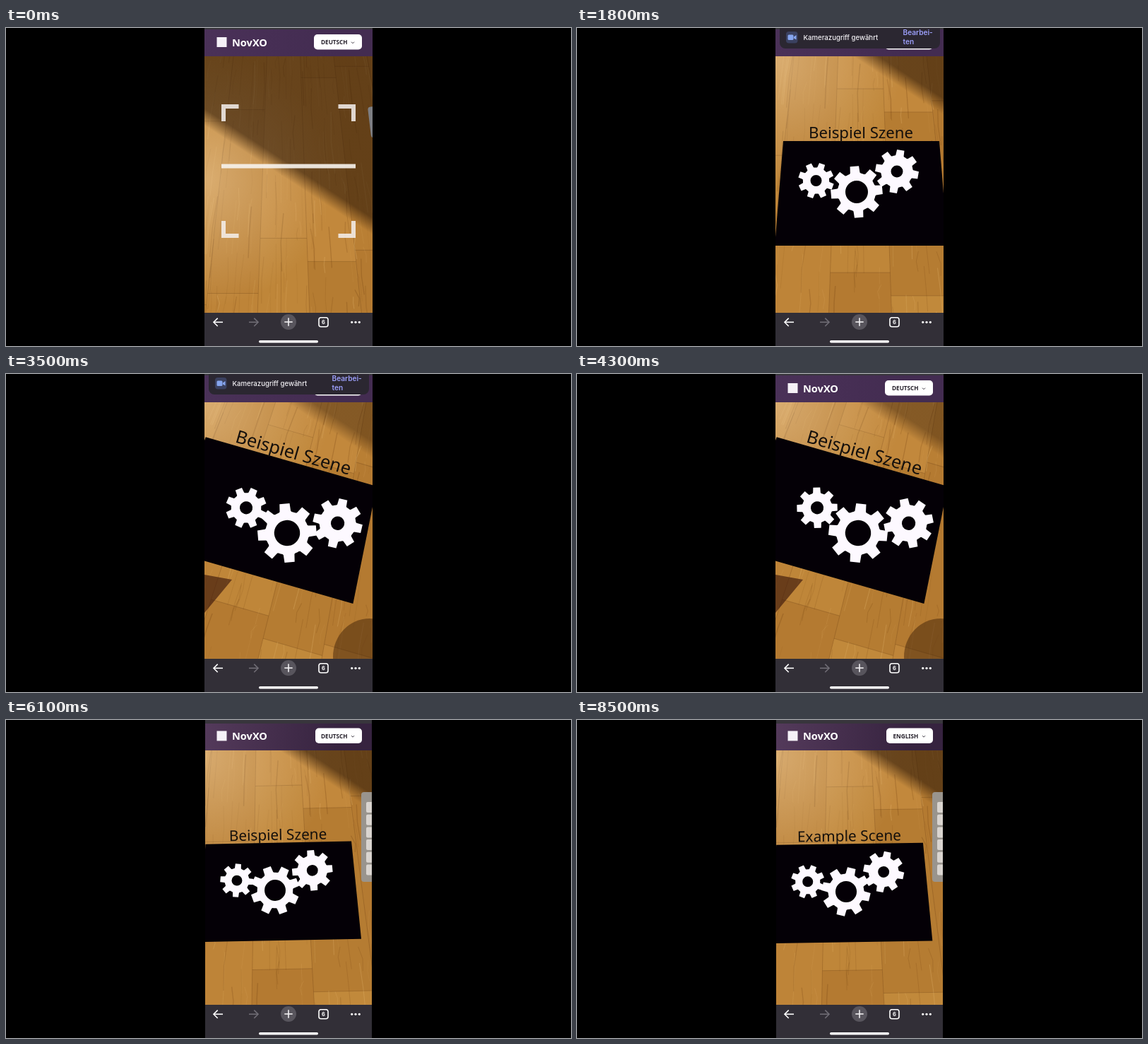
An HTML page with a canvas for the animation above (8600 ms loop, 800x450 px).

```html
<!DOCTYPE html>
<html lang="de">
<head>
<meta charset="utf-8">
<title>AR demo</title>
<style>
html, body { margin: 0; width: 100%; height: 100%; overflow: hidden; background: #000; }
canvas { display: block; }
</style>
</head>
<body>
<canvas id="stage" width="800" height="450"></canvas>
<script>
const ctx = document.getElementById('stage').getContext('2d');
const LOOP = 8600, DETECT = 1500, PAGE_IN = 4400, PAGE_OUT = 5900, MENU = 6700, ENGLISH = 7500;
const SANS = '"Noto Sans", "Open Sans", sans-serif';
const BRAND = 'NovXO';

// The marker as the camera sees it; everything in the scene follows it.
const path = [
  { t: 0, x: 388, y: 514, size: .87, angle: 0, tilt: 0 },
  { t: 900, x: 388, y: 405, size: .9, angle: 0, tilt: 0 },
  { t: 1800, x: 396, y: 232, size: 1, angle: 0, tilt: 0 },
  { t: 3500, x: 398, y: 225, size: 1.14, angle: .28, tilt: 24 },
  { t: 7000, x: 381, y: 241, size: .935, angle: -.02, tilt: 0 },
  { t: 8500, x: 381, y: 243, size: .94, angle: -.015, tilt: 0 }];
const gears = [
  { x: -57.5, y: -16, r: 25.5, hole: 8, phase: 20, speed: -87 },
  { x: 0, y: 0, r: 37, hole: 16, phase: -5, speed: 70 },
  { x: 57, y: -29, r: 31, hole: 8.5, phase: 10, speed: -87 }];

function poseAt(t) {
  const i = Math.max(1, path.findIndex(k => k.t >= t));
  const a = path[i - 1], b = path[i], k = (t - a.t) / (b.t - a.t);
  const pose = {};
  for (const key in a) pose[key] = a[key] + (b[key] - a[key]) * k;
  return pose;
}
const ramp = (t, a, b) => {
  const k = Math.min(1, Math.max(0, (t - a) / (b - a)));
  return k * k * (3 - 2 * k);
};
function seeded(s) {
  return () => (s = (s * 16807) % 2147483647) / 2147483647;
}
function rect(x, y, w, h, fill, r = 0) {
  ctx.fillStyle = fill;
  ctx.beginPath();
  ctx.roundRect(x, y, w, h, r);
  ctx.fill();
}
function poly(p, fill) {
  ctx.fillStyle = fill;
  ctx.beginPath();
  for (let i = 0; i < p.length; i += 2) ctx.lineTo(p[i], p[i + 1]);
  ctx.closePath();
  ctx.fill();
}
function oval(x, y, rx, ry, fill, angle = 0) {
  ctx.fillStyle = fill;
  ctx.beginPath();
  ctx.ellipse(x, y, rx, ry, angle, 0, 7);
  ctx.fill();
}
function line(p, color, width) {
  ctx.strokeStyle = color;
  ctx.lineWidth = width;
  ctx.beginPath();
  for (let i = 0; i < p.length; i += 2) ctx.lineTo(p[i], p[i + 1]);
  ctx.stroke();
}
function text(s, x, y, font, fill, align = 'left') {
  ctx.font = font;
  ctx.fillStyle = fill;
  ctx.textAlign = align;
  ctx.fillText(s, x, y);
}
function layer(draw) {
  ctx.save();
  draw();
  ctx.restore();
}
function clipped(x, y, w, h, r, draw) {
  layer(() => {
    ctx.beginPath();
    ctx.roundRect(x, y, w, h, r);
    ctx.clip();
    draw();
  });
}
function glow(x, y, r, rgb, alpha) {
  const g = ctx.createRadialGradient(x, y, 0, x, y, r);
  g.addColorStop(0, `rgba(${rgb},${alpha})`);
  g.addColorStop(1, `rgba(${rgb},0)`);
  ctx.fillStyle = g;
  ctx.fillRect(x - r, y - r, 2 * r, 2 * r);
}

// Floor planks and grain fan out towards the viewer.
const fan = (u, v) => [u * (1 + v * .0011), v];
function planks() {
  const rnd = seeded(71);
  for (let c = -6; c <= 6; c++) {
    const u = c * 66 - 33;
    const start = c ? rnd() * 260 : 0;
    for (let v = start - 780; v < 560; v += 260) {
      const tone = rnd() < .5 ? '85,42,5' : '255,205,120';
      poly([...fan(u, v), ...fan(u + 66, v), ...fan(u + 66, v + 260), ...fan(u, v + 260)],
        `rgba(${tone},${rnd() * .1})`);
      line([...fan(u, v), ...fan(u + 66, v)], 'rgba(80,42,10,.22)', 1);
    }
    line([...fan(u, -420), ...fan(u, 540)], 'rgba(80,42,10,.2)', 1);
  }
  for (let i = 0; i < 900; i++) {
    const u = (rnd() - .5) * 640, v = rnd() * 860 - 400, len = 15 + rnd() * 75, bend = (rnd() - .5) * 9;
    const tone = rnd() < .55 ? '96,50,8' : '250,210,140';
    line([...fan(u, v), ...fan(u + bend, v + len / 2), ...fan(u + bend * .6, v + len)],
      `rgba(${tone},${.05 + rnd() * .18})`, .5 + rnd());
  }
}
function shadow(y, alpha) {
  const slope = .65, n = Math.hypot(slope, 1);
  const g = ctx.createLinearGradient(400 + slope / n * 11, y - 11 / n, 400 - slope / n * 9, y + 9 / n);
  g.addColorStop(0, `rgba(43,22,5,${alpha})`);
  g.addColorStop(1, 'rgba(43,22,5,0)');
  ctx.fillStyle = g;
  ctx.fillRect(280, 0, 240, 404);
}
function wood({ x, y, angle, tilt }) {
  const edge = .6 * y - 104;
  rect(280, 0, 240, 404, 'hsl(34 56% 47%)');
  layer(() => {
    ctx.translate(x + 5, .75 * y - 88);
    ctx.rotate(angle);
    planks();
  });
  glow(281, edge + 10, 180, '255,228,190', .42);
  shadow(edge, .6 - tilt * .008);
  ctx.globalAlpha = tilt / 24;
  oval(515, 400, 52, 54, 'rgba(66,34,8,.5)');
  poly([281, 284, 320, 291, 281, 338], 'rgba(60,24,12,.65)');
  ctx.globalAlpha = 1;
}
function keyboard(t, { y }) {
  if (t < DETECT) {
    layer(() => {
      ctx.translate(512, .5 * y - 145);
      ctx.rotate(-.12);
      rect(0, 0, 40, 44, '#7d7e83', 4);
    });
  } else if (t >= PAGE_OUT) {
    rect(503, 102, 30, 127, '#99948d', 4);
    for (let i = 0; i < 6; i++) rect(510, 116 + i * 17.7, 14, 15, '#dad5d0', 2);
  }
}

function gear(g, deg, fill) {
  ctx.fillStyle = fill;
  ctx.beginPath();
  for (let i = 0; i < 8; i++) {
    const mid = (deg - 90 + i * 45) * Math.PI / 180;
    for (const [d, k] of [[-.25, .75], [-.17, 1], [.17, 1], [.25, .75]])
      ctx.lineTo(g.x + Math.cos(mid + d) * g.r * k, g.y + Math.sin(mid + d) * g.r * k);
    ctx.arc(g.x, g.y, g.r * .73, mid + .3, mid + .485);
  }
  ctx.closePath();
  ctx.moveTo(g.x + g.hole, g.y);
  ctx.arc(g.x, g.y, g.hole, 0, Math.PI * 2);
  ctx.fill('evenodd');
}
function marker(t, { x, y, size, angle, tilt }) {
  const live = t >= DETECT, wide = live ? 1 : .82;
  const place = (shift, draw) => layer(() => {
    ctx.translate(x - shift, y - shift);
    ctx.rotate(angle);
    ctx.scale(size, size);
    draw();
  });
  place(tilt, () => {
    poly([-104 * wide, -72, 117 * wide, -72, 129 * wide, 76, -116 * wide, 76], live ? '#040006' : '#292124');
    if (live) text(t >= ENGLISH ? 'Example Scene' : 'Beispiel Szene', 6, -76, `22.2px ${SANS}`, '#15100c', 'center');
  });
  place(0, () => {
    for (const g of gears)
      gear(g, g.phase + (live ? g.speed * (t - 1800) / 1000 : 0), live ? '#fdf9ff' : '#b9a688');
  });
}
function scanner(t) {
  for (const sx of [1, -1]) for (const sy of [1, -1]) layer(() => {
    ctx.translate(400 - sx * 95, 202.5 - sy * 94.5);
    ctx.scale(sx, sy);
    poly([0, 0, 24.5, 0, 24.5, 6, 6, 6, 6, 24, 0, 24], 'rgba(244,240,238,.86)');
  });
  const y = 201 - 92 * Math.cos(1.51 + t * Math.PI / 1000);
  rect(305, y - 3, 190, 6, 'rgba(248,243,238,.9)');
}

// A laughing fox in a few soft shapes.
function fox() {
  rect(301, 156, 198, 149, '#232428');
  ctx.filter = 'blur(2px)';
  rect(462, 150, 50, 160, '#6a4b34');
  glow(492, 270, 60, '240,222,202', .9);
  oval(402, 300, 62, 52, '#b07a48');
  poly([305, 183, 352, 194, 368, 212, 345, 232], '#cf9054');
  poly([314, 190, 340, 199, 342, 216], '#7a5038');
  poly([489, 160, 478, 200, 456, 220, 418, 186], '#b87a44');
  poly([485, 164, 475, 196, 444, 200], '#42302a');
  oval(401, 230, 57, 50, '#cc8c4e');
  oval(388, 204, 28, 22, '#dfa668');
  oval(367, 255, 22, 17, '#e6ded6', .7);
  oval(437, 254, 20, 17, '#d8cabc', -.7);
  oval(400, 284, 30, 24, '#8f8680');
  oval(428, 220, 19, 13, '#4a3527', .2);
  ctx.filter = 'none';
  line([366, 221, 376, 227, 386, 223], '#40281b', 2);
  oval(403, 254, 14, 19, '#33201f');
  oval(404, 260, 8, 8, '#b98078');
  line([392, 247, 396, 259, 410, 260, 414, 248], '#eee7df', 2);
  oval(400, 230, 9, 8, '#171518');
}
function page(t) {
  rect(281, 40, 238, 363, '#f7f0f7');
  layer(() => {
    ctx.translate(0, 45 * (1 - ramp(t, 4500, 5000)));
    rect(301.5, 14, 197.5, 119, '#3d2a55', 18);
    text('Headline', 400, 66, '900 36.8px Lato, sans-serif', '#fff', 'center');
    ['This is a sample subheadline', 'for demonstration.'].forEach((s, i) =>
      text(s, 400, 94.5 + i * 19, '900 14.6px Lato, sans-serif', '#fff', 'center'));
    rect(301.5, 158, 197.5, 148, 'rgba(60,40,70,.16)', 6);
    clipped(301.5, 156, 197.5, 148, 5, fox);
    ['This is an example description shown when no', 'Fablecrux content is available. Replace it with',
      'your real content.'].forEach((s, i) => text(s, 301.5, 346.5 + i * 12.2, `8.5px ${SANS}`, '#3d3a42'));
  });
}

function header(t, onPage, late) {
  const top = late ? 5 : 2, dy = late ? 2.5 : 0;
  const [left, right] = onPage ? ['#65557b', '#62527a'] : late ? ['#543a5b', '#36233f'] : ['#4a3158', '#432c51'];
  const g = ctx.createLinearGradient(281, 0, 519, 20);
  g.addColorStop(0, left);
  g.addColorStop(.8, right);
  rect(281, 0, 238, top, '#38353c');
  rect(281, top, 238, 38, g);
  rect(298.5, 13 + dy, 14, 14, '#f5f1f7');
  text(BRAND, 320, 25.5 + dy, `700 14.6px ${SANS}`, '#fff');

  const open = t >= MENU && t < ENGLISH, english = t >= ENGLISH;
  const x = late && !open ? 438 : 436;
  const font = `700 8.2px ${SANS}`;
  rect(x, 9 + dy, 504 - x, 21.5, open ? '#231b2c' : '#fff', 5);
  text(english ? 'ENGLISH' : 'DEUTSCH', english ? 447.5 : 446, 23 + dy, font, open ? '#fff' : '#25202b');
  if (open) {
    rect(436, 37, 77, 47, '#e9e4e3', 5);
    text('ENGLISH', 446.5, 53.5, font, '#37323a');
    text('DEUTSCH', 446.5, 73, font, '#37323a');
  } else line([489, 19.7 + dy, 491, 21.7 + dy, 493, 19.7 + dy], '#3c3742', 1);
}
function banner(t) {
  const shown = ramp(t, 1000, 1400) - ramp(t, 3900, 4300);
  layer(() => {
    ctx.translate(0, -34 * (1 - shown));
    rect(287, -12, 227, 41, '#2b2731', 8);
    rect(296, 5, 16.5, 16.5, '#3b4160', 4);
    rect(298.5, 9.5, 8, 7.5, '#86a5ee', 1.5);
    poly([307, 12.5, 310.5, 10, 310.5, 16.5, 307, 14.5], '#86a5ee');
    text('Kamerazugriff gewährt', 320.5, 16.5, '500 9.6px Inter, sans-serif', '#f3f1f5');
    ['Bearbei-', 'ten'].forEach((s, i) =>
      text(s, 461.5, 10 + i * 13, '600 10.1px Inter, sans-serif', '#9c9ffa'));
  });
}
function arrow(x, dir, color) {
  line([x + 6.5 * dir, 416.3, x - 6.5 * dir, 416.3], color, 1.6);
  line([x - .8 * dir, 410.6, x - 6.5 * dir, 416.3, x - .8 * dir, 422], color, 1.6);
}
function toolbar() {
  rect(281, 403, 238, 47, '#322f37');
  arrow(300.5, 1, '#fff');
  arrow(350.5, -1, '#706d75');
  oval(400, 416, 11, 11, '#58555d');
  line([394.3, 416, 405.7, 416], '#f2f0f3', 1.6);
  line([400, 410.3, 400, 421.7], '#f2f0f3', 1.6);
  ctx.strokeStyle = '#fff';
  ctx.beginPath();
  ctx.roundRect(443, 409.7, 13, 13, 3);
  ctx.stroke();
  text('6', 449.5, 419, '700 7.5px Inter, sans-serif', '#fff', 'center');
  for (let i = -1; i <= 1; i++) oval(495 + i * 5.3, 416.3, 1.6, 1.6, '#fff');
  rect(358, 442, 84, 3.4, '#fff', 1.7);
}

function draw(t) {
  const late = t >= PAGE_OUT, onPage = t >= PAGE_IN && !late;
  const pose = poseAt(late ? Math.max(t, 7000) : Math.min(t, 3500));
  ctx.fillStyle = '#000';
  ctx.fillRect(0, 0, 800, 450);
  clipped(late ? 282 : 281, 0, late ? 236 : 238, 450, 0, () => {
    if (onPage) page(t);
    else {
      wood(pose);
      keyboard(t, pose);
      marker(t, pose);
      if (t < DETECT) scanner(t);
    }
    header(t, onPage, late);
    banner(t);
    toolbar();
  });
}
const begin = performance.now();
function tick() {
  const t = (performance.now() - begin) % LOOP;
  draw(Math.floor(t / 100) * 100);
  requestAnimationFrame(tick);
}
tick();
</script>
</body>
</html>
```
